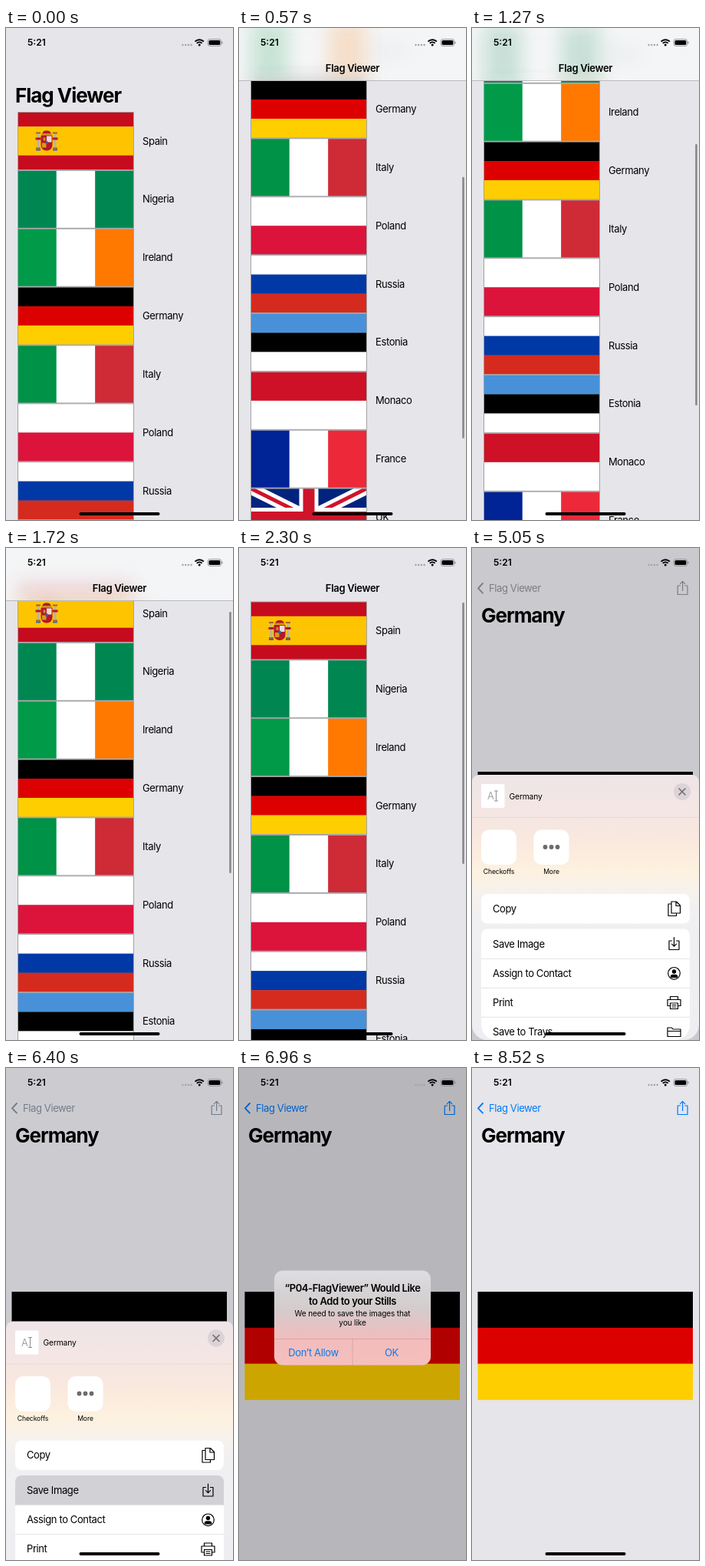
Animation, 296 px wide and 640 px high, one loop 8.55 s. Source, as an HTML page with a canvas:

```html
<!DOCTYPE html>
<html lang="en">
<head>
<meta charset="utf-8">
<title>Flag Viewer</title>
<style>
html, body { margin: 0; width: 100%; height: 100%; overflow: hidden; background: #e5e5ea; }
canvas { display: block; width: 296px; height: 640px; }
</style>
</head>
<body>
<canvas id="stage" width="296" height="640"></canvas>
<script>
const W = 296, H = 640, LOOP = 8550;
const BG = '#e5e5ea', BLUE = '#007aff', NAV_BOTTOM = 68, COLLAPSED = 39.5, PITCH = 75.85;
const ctx = document.getElementById('stage').getContext('2d');

// Bursts of motion: start, end, number of picture changes.
const BURSTS = [
  [130, 790, 7], [930, 1720, 8], [1820, 1920, 2], [2070, 2300, 3], [2650, 3200, 6],
  [3850, 3850, 1], [4260, 5050, 8], [6230, 6230, 1], [6400, 6960, 6], [7950, 8520, 6]
];
const SCROLL = [[0, 0], [130, 8], [240, 52], [460, 220], [680, 318], [790, 330], [930, 316], [1270, 189],
  [1720, 62], [1820, 36], [1920, 27], [2070, 33], [2190, 38], [2300, COLLAPSED]];
const PUSH = [[2650, 0], [2760, .3], [2870, .72], [2980, .91], [3090, .98], [3200, 1]];
const SHEET = [[4150, 0], [4260, .04], [4370, .27], [4490, .6], [4600, .82], [4710, .93], [4830, .98],
  [5050, 1], [6230, 1], [6400, .9], [6510, .55], [6620, .2], [6740, .03], [6850, 0]];
const ALERT = [[6620, 0], [6740, .5], [6850, .88], [6960, 1], [7950, 1], [8060, .85], [8180, .5],
  [8290, .2], [8410, .05], [8520, 0]];

const lerp = (a, b, p) => a + (b - a) * p;
const clamp = v => Math.max(0, Math.min(1, v));

function track(keys, t) {
  const i = keys.findIndex(k => k[0] > t);
  if (i < 0) return keys[keys.length - 1][1];
  if (i === 0) return keys[0][1];
  const [t0, a] = keys[i - 1], [t1, b] = keys[i];
  return lerp(a, b, (t - t0) / (t1 - t0));
}

function heldTime(t) {
  let held = 0;
  for (const [start, end, count] of BURSTS) {
    if (t < start) break;
    const step = count > 1 ? (end - start) / (count - 1) : 1;
    const k = Math.min(count - 1, Math.floor((t - start) / step + .01));
    held = Math.round((start + k * step) / 10) * 10;
  }
  return held;
}

function scoped(draw, { x = 0, y = 0, alpha = 1 } = {}) {
  ctx.save();
  ctx.translate(x, y);
  ctx.globalAlpha *= alpha;
  draw();
  ctx.restore();
}

function text(str, x, y, size = 13, { weight = 400, color = '#000', align = 'left', spacing = -.03 } = {}) {
  ctx.font = `${weight} ${size}px Inter, sans-serif`;
  ctx.letterSpacing = `${spacing * size}px`;
  ctx.textAlign = align;
  ctx.fillStyle = color;
  ctx.fillText(str, x, y);
}

function rect(color, x, y, w, h) {
  ctx.fillStyle = color;
  ctx.fillRect(x, y, w, h);
}

function round(color, x, y, w, h, r) {
  ctx.fillStyle = color;
  ctx.beginPath();
  ctx.roundRect(x, y, w, h, r);
  ctx.fill();
}

function disc(color, x, y, r) {
  ctx.fillStyle = color;
  ctx.beginPath();
  ctx.arc(x, y, r, 0, 7);
  ctx.fill();
}

function stroke(d, color = '#000', width = 1.2) {
  ctx.strokeStyle = color;
  ctx.lineWidth = width;
  ctx.lineCap = ctx.lineJoin = 'round';
  ctx.stroke(new Path2D(d));
}

function gradient(y0, y1, stops) {
  const g = ctx.createLinearGradient(0, y0, 0, y1);
  stops.forEach(([at, color]) => g.addColorStop(at, color));
  return g;
}

// Flags: each painter fills a w × h box at the origin.
const rows = (...colors) => (w, h) =>
  colors.forEach((c, i) => rect(c, 0, i * h / colors.length, w, h / colors.length + .3));
const columns = (...colors) => (w, h) =>
  colors.forEach((c, i) => rect(c, i * w / colors.length, 0, w / colors.length, h));

function spain(w, h) {
  rows('#c60b1e', '#ffc400', '#ffc400', '#c60b1e')(w, h);
  for (const x of [25, 47]) {
    rect('#b9b3a5', x, 28, 3, 19);
    rect('#a5642c', x - 1.5, 26, 6, 2);
    rect('#a5642c', x - 1.5, 46, 6, 2);
    rect('#3d68a8', x - 1.5, 48, 6, 2);
    rect('#b5172b', x - 2, 33, 7, 3);
  }
  round('#b5172b', 30, 30, 15, 20, [1, 1, 7, 7]);
  rect('#e8ddd8', 37.5, 31, 6.5, 8);
  rect('#d99a1b', 31.5, 40, 5.5, 6);
  rect('#c98d22', 33, 33, 3, 4);
  disc('#3d5fa8', 37.5, 39.5, 2);
  round('#b5172b', 31.5, 24, 12, 5, [5, 5, 0, 0]);
  rect('#c98d22', 31, 27.5, 13, 2);
}

function unitedKingdom(w, h) {
  rect('#00247d', 0, 0, w, h);
  ctx.beginPath();
  ctx.rect(0, 0, w, h);
  ctx.clip();
  const diagonals = `M0 0L${w} ${h}M${w} 0L0 ${h}`, cross = `M${w / 2} 0V${h}M0 ${h / 2}H${w}`;
  stroke(diagonals, '#fff', 15);
  stroke(diagonals, '#cf142b', 5);
  stroke(cross, '#fff', 25);
  stroke(cross, '#cf142b', 15);
}

function unitedStates(w, h) {
  rows(...Array.from({ length: 13 }, (_, i) => i % 2 ? '#fff' : '#b22234'))(w, h);
  rect('#3c3b6e', 0, 0, w * .4, h * 7 / 13);
  for (let r = 0; r < 9; r++)
    for (let c = r % 2; c < 11; c += 2) disc('#fff', 5 + c * 5, 4 + r * 4, 1.2);
}

const germany = rows('#000', '#dd0000', '#ffce00');
const FLAGS = [
  ['Spain', spain],
  ['Nigeria', columns('#008751', '#fff', '#008751')],
  ['Ireland', columns('#009a49', '#fff', '#ff7900')],
  ['Germany', germany],
  ['Italy', columns('#009246', '#fff', '#ce2b37')],
  ['Poland', rows('#fff', '#dc143c')],
  ['Russia', rows('#fff', '#0039a6', '#d52b1e')],
  ['Estonia', rows('#4891d9', '#000', '#fff')],
  ['Monaco', rows('#ce1126', '#fff')],
  ['France', columns('#002395', '#fff', '#ed2939')],
  ['UK', unitedKingdom],
  ['US', unitedStates]
];

function flagRows(scroll, pressed) {
  FLAGS.forEach(([name, paint], i) => {
    const y = 109.5 + i * PITCH - scroll;
    if (y > H || y < -PITCH) return;
    if (name === pressed) rect('#d1d1d6', 0, y - .5, W, PITCH);
    scoped(() => paint(151, 75), { x: 15.5, y });
    ctx.strokeStyle = '#a3a3a6';
    ctx.lineWidth = 1;
    ctx.strokeRect(15.5, y, 151, 75);
    text(name, 178, y + 42, 13);
  });
}

function listPage(scroll, pressed, indicator) {
  rect(BG, 0, 0, W, H);
  scoped(() => {
    ctx.beginPath();
    ctx.rect(0, NAV_BOTTOM, W, H);
    ctx.clip();
    if (scroll < COLLAPSED) text('Flag Viewer', 12, 96.8 - scroll, 26, { weight: 700, spacing: -.04 });
    flagRows(scroll, pressed);
  });
  if (scroll > COLLAPSED + 1) {
    scoped(() => {
      ctx.beginPath();
      ctx.rect(0, 0, W, NAV_BOTTOM);
      ctx.clip();
      rect('#f4f5f6', 0, 0, W, NAV_BOTTOM);
      ctx.filter = 'blur(12px)';
      ctx.globalAlpha = .18;
      flagRows(scroll);
    });
    rect('#b9babd', 0, NAV_BOTTOM, W, 1);
  }
  if (indicator) {
    const gap = Math.max(0, COLLAPSED - scroll);
    const top = 71 + gap + Math.max(0, scroll - COLLAPSED) * .535;
    round('rgba(0,0,0,.42)', 291.2, top, 2.5, 340 - gap * .6, 1.25);
  }
}

function detailPage() {
  rect(BG, 0, 0, W, H);
  text('Germany', 12, 96.8, 26, { weight: 700, spacing: -.04 });
  scoped(() => germany(280.5, 140.5), { x: 7.5, y: 291 });
}

function detailNav(push, tint, iconAlpha) {
  scoped(() => {
    stroke('M14 46L8 52.3L14 58.6', tint, 1.9);
    text('Flag Viewer', lerp(105, 22, push), 56.8, 13, { color: tint });
  }, { alpha: push });
  scoped(() => stroke('M271.5 49H268.2V60.5H281V49H277.7M274.6 55.5V43.6M271.4 46.6L274.6 43.4L277.8 46.6',
    tint, 1.2), { alpha: push * iconAlpha });
}

function statusBar() {
  text('5:21', 28, 23.2, 12, { weight: 600, spacing: 0 });
  for (let i = 0; i < 4; i++) disc('#a4a4a8', 230.5 + i * 3.7, 22, 1.2);
  ctx.strokeStyle = '#000';
  ctx.lineWidth = 2;
  ctx.lineCap = 'butt';
  for (const r of [8, 4.8]) {
    ctx.beginPath();
    ctx.arc(252.2, 23.3, r, -Math.PI * .75, -Math.PI * .25);
    ctx.stroke();
  }
  disc('#000', 252.2, 22, 1.5);
  ctx.strokeStyle = '#8e8e93';
  ctx.lineWidth = .9;
  ctx.beginPath();
  ctx.roundRect(263.2, 14.6, 17.4, 8.8, 2.6);
  ctx.stroke();
  round('#000', 264.5, 15.9, 14.8, 6.2, 1.5);
  round('#8e8e93', 281.4, 17.5, 1.2, 3, 1);
}

const ACTIONS = [
  ['Save Image', 'M260.5 511H257V522.5H270V511H266.5M263.5 506.5V518.2M260.5 515.2L263.5 518.2L266.5 515.2'],
  ['Assign to Contact', ''],
  ['Print', 'M258.5 595.5H255V587.5H272V595.5H268.5M258.5 587V583.5H268.5V587M258.5 592H268.5V599.5H258.5ZM261 594.5H266M261 597H266'],
  ['Save to Trays', 'M255 635.5V624H260.5L262 626H272V635.5ZM255 628.5H272']
];

function shareSheet(pressed) {
  round(gradient(295, 640, [[0, '#eee5e7'], [.16, '#f5e6e3'], [.24, '#f9e8de'], [.36, '#fdf1df'],
    [.44, '#f6f2ec'], [.54, '#f0f0f2'], [1, '#eeeef2']]), 0, 295, W, 345, [9, 9, 20, 20]);
  round('#fff', 12, 307, 30.5, 31, 2);
  text('A', 20, 327, 13, { color: '#8e8e93', weight: 300 });
  stroke('M31.5 316.5V328.5M29.5 316H33.5M29.5 329H33.5', '#8e8e93', 1);
  text('Germany', 48.5, 326.6, 10.3, { spacing: -.015 });
  disc('#dbd3d6', 274, 317, 11);
  stroke('M270 313L278 321M278 313L270 321', '#6f6d72', 1.6);
  rect('#e2d6d5', 0, 350, W, .8);

  for (const [label, x] of [['Checkoffs', 35], ['More', 103.5]]) {
    round('#fff', x - 23, 366.5, 46, 45.5, 10);
    text(label, x, 424, 8.6, { align: 'center', spacing: -.01 });
  }
  for (const x of [95.5, 103.5, 111.5]) disc('#6b6b6e', x, 389, 2.9);

  round('#fff', 12, 450, 272, 38.5, 8);
  text('Copy', 27, 473.8, 13);
  stroke('M260 463H256V478.5H266.5V475.5M260 460H266.5L271.5 465V475H260ZM266 460V465.5H271.5', '#000', 1.2);

  round('#fff', 12, 495.5, 272, 144.5, [8, 8, 20, 20]);
  if (pressed) round('#d1d1d6', 12, 495.5, 272, 38, [8, 8, 0, 0]);
  ACTIONS.forEach(([label, icon], i) => {
    const y = 515 + i * 38;
    text(label, 27, y + 4.7, 13);
    if (icon) stroke(icon);
    if (i) rect('#dcdce0', 12, y - 19.2, 272, .8);
  });
  ctx.strokeStyle = '#000';
  ctx.beginPath();
  ctx.arc(263.5, 553.3, 7.8, 0, 7);
  ctx.stroke();
  disc('#000', 263.5, 551, 2.7);
  round('#000', 258.7, 554.7, 9.6, 4.4, [4, 4, 2, 2]);
}

function alertBox(pressed) {
  const center = { align: 'center' }, bold = { align: 'center', weight: 600 };
  const blue = { align: 'center', color: '#087bea' };
  round(gradient(263, 386, [[0, '#dedee1'], [.2, '#d6d4d6'], [.4, '#d4cccd'], [.58, '#e3c3c4'],
    [.74, '#f3bcbd'], [1, '#f5bfbd']]), 46, 263.5, 204, 123, 11);
  if (pressed) round('rgba(120,80,80,.2)', 148, 352.5, 102, 34, [0, 0, 11, 0]);
  text('“P04-FlagViewer” Would Like', 148, 291, 13, bold);
  text('to Add to your Stills', 148, 307.5, 13, bold);
  text('We need to save the images that', 148, 322.6, 10, { ...center, spacing: -.01 });
  text('you like', 148, 335, 10, { ...center, spacing: -.01 });
  rect('rgba(90,60,60,.22)', 46, 352, 204, .8);
  rect('rgba(90,60,60,.22)', 147.6, 352.5, .8, 34);
  text('Don’t Allow', 97, 374.7, 13, blue);
  text('OK', 199, 374.7, 13, blue);
}

function render(time) {
  const t = heldTime(time);
  const scroll = track(SCROLL, t), push = track(PUSH, t), sheet = track(SHEET, t), alert = track(ALERT, t);

  if (push < 1) {
    scoped(() => listPage(scroll, t >= 2650 && 'Germany', t >= 130 && t < 2650), { x: -push * W * .3 });
    rect(`rgba(0,0,0,${.1 * push})`, 0, NAV_BOTTOM, W, H);
  }
  if (push > 0) scoped(detailPage, { x: (1 - push) * W });
  if (push < 1) {
    scoped(() => text('Flag Viewer', lerp(148, 56, push), 56.8, 13, { weight: 600, align: 'center', spacing: -.025 }),
      { alpha: clamp((scroll - 18) / 8) * (1 - push) });
  }
  if (push > 0) {
    const tint = `rgb(${lerp(0, 142, sheet)},${lerp(122, 142, sheet)},${lerp(255, 147, sheet)})`;
    detailNav(push, tint, t >= 3850 && t < 4260 ? .25 : 1);
  }
  rect(`rgba(0,0,0,${.12 * sheet + .2 * alert})`, 0, 0, W, H);
  statusBar();
  if (sheet > 0) scoped(() => shareSheet(t >= 6230), { y: (1 - sheet) * 345 });
  if (alert > 0) {
    scoped(() => {
      const scale = t < 7000 ? 1 + .15 * (1 - alert) : 1;
      ctx.translate(148, 325);
      ctx.scale(scale, scale);
      ctx.translate(-148, -325);
      alertBox(t >= 7950);
    }, { alpha: alert });
  }
  if (alert < .5 || t >= 8180) scoped(() => round('#000', 95.5, 630, 105, 4, 2), { alpha: 1 - alert });
}

const started = performance.now();
function tick() {
  render((performance.now() - started) % LOOP);
  requestAnimationFrame(tick);
}
tick();
</script>
</body>
</html>
```
